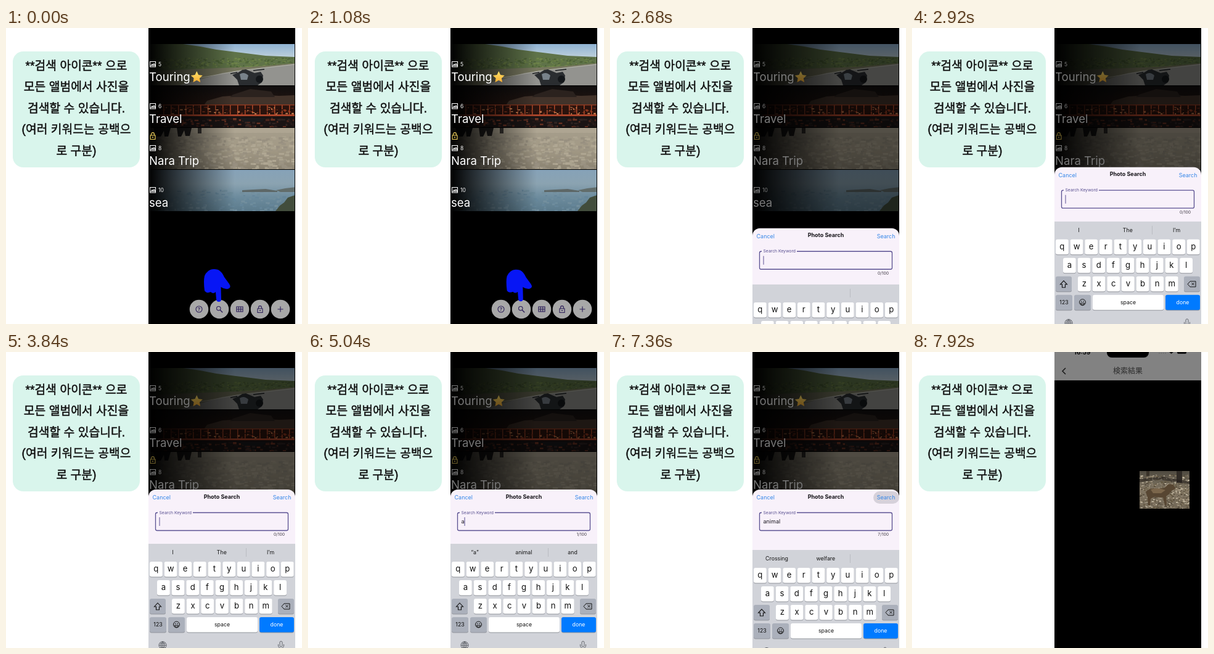
An HTML page with a canvas that plays this animation: 480x480 px, repeating every 8000 ms.

```html
<!DOCTYPE html>
<html lang="ko">
<head>
<meta charset="utf-8">
<title>Photo search guide</title>
<style>
html, body { margin: 0; height: 100%; overflow: hidden; background: #fff; }
canvas { display: block; width: 480px; height: 480px; }
</style>
</head>
<body>
<canvas id="stage" width="480" height="480"></canvas>
<script>
const LOOP = 8000, LEFT = 231, WIDTH = 238;
const KEYBOARD_HEIGHT = 186, SHEET_HEIGHT = 257;
const UI = 'Inter, "Noto Sans", sans-serif';
const KOREAN = '"Liberation Sans", "Noto Sans CJK KR", "Noto Sans CJK", sans-serif';
const JAPANESE = '"Noto Sans CJK JP", "Noto Sans CJK", sans-serif';
const PURPLE = '#594f91', INK = '#2b1d58';

const screen = document.getElementById('stage').getContext('2d');
let c = screen;

const clamp = x => Math.max(0, Math.min(1, x));
const progress = (t, start, length) => clamp((t - start) / length);
const easeOut = x => 1 - (1 - x) ** 3;
// Critically damped settling: 1 at the start, towards 0.
const settle = (t, start) => {
  const x = Math.max(0, t - start) * 0.0195;
  return (1 + x) * Math.exp(-x);
};
function random(seed) {
  return () => (seed = (seed * 16807) % 2147483647) / 2147483647;
}

function rect(x, y, w, h, fill) {
  c.fillStyle = fill;
  c.fillRect(x, y, w, h);
}
function round(x, y, w, h, r, fill) {
  c.beginPath();
  c.roundRect(x, y, w, h, r);
  c.fillStyle = fill;
  c.fill();
}
function disc(x, y, r, fill) {
  c.beginPath();
  c.arc(x, y, r, 0, Math.PI * 2);
  c.fillStyle = fill;
  c.fill();
}
function shape(d, fill) {
  c.fillStyle = fill;
  c.fill(new Path2D(d));
}
function line(d, color, width = 1) {
  c.strokeStyle = color;
  c.lineWidth = width;
  c.stroke(new Path2D(d));
}
function text(s, x, y, size, color, align = 'left', weight = 400, family = UI) {
  c.font = `${weight} ${size}px ${family}`;
  c.textAlign = align;
  c.fillStyle = color;
  c.fillText(s, x, y);
}
function vertical(y0, y1, ...colors) {
  const g = c.createLinearGradient(0, y0, 0, y1);
  colors.forEach((color, i) => g.addColorStop(i / (colors.length - 1), color));
  return g;
}
function at(x, y, draw) {
  c.save();
  c.translate(x, y);
  draw();
  c.restore();
}
function speckle(seed, count, w, y, h, colors, size) {
  const rnd = random(seed);
  for (let i = 0; i < count; i++) {
    rect(rnd() * w, y + rnd() * h, size * (0.5 + rnd()), size * (0.3 + rnd() * 0.4),
      colors[Math.floor(rnd() * colors.length)]);
  }
}

function roadPhoto() {
  rect(0, 0, WIDTH, 67, vertical(0, 24, '#8fb2d2', '#c3d3dc'));
  shape('M0 0H56L84 4 110 9 150 14 190 19 238 21V67H0Z', '#5f7349');
  speckle(11, 420, WIDTH, 22, 16, ['#72884a', '#4c6136', '#647a43'], 3);
  shape('M0 44L90 40 170 37 238 31V67H0Z', '#77775f');
  shape('M50 67L120 47 195 37 238 32V67Z', '#93938f');
  line('M72 57L148 43 238 33', '#b4b4a8', 1);
  shape('M136 50L146 46 152 42 158 41 165 44 172 47 182 45 186 51 184 62 177 67H147L144 58Z', '#2a2d30');
  shape('M148 49Q155 44 162 51L160 58H150Z', '#78828a');
  disc(180, 57, 6, '#14171a');
  line('M133 48L144 46M170 43L188 41', '#1d2022', 1.6);
}
function shrinePhoto() {
  rect(0, 0, WIDTH, 67, vertical(0, 67, '#110f0f', '#241510', '#0d0b0c'));
  shape('M95 24L120 17 165 14 212 16 238 15V31H90Z', '#42332a');
  shape('M137 14L165 5 199 9 205 18H132Z', '#2b221e');
  rect(20, 31, 218, 14, '#2b130d');
  for (let x = 24; x < WIDTH; x += 12) rect(x, 30, 1.5, 16, '#b04a2a');
  speckle(23, 110, WIDTH, 33, 12, ['#d98a56', '#6e2b1a', '#1c100d', '#94391f'], 3);
  rect(20, 30, 218, 1.5, '#8d3a22');
  rect(15, 46, 223, 3, '#a9442a');
  rect(0, 50, WIDTH, 17, '#1a1414');
  speckle(31, 120, WIDTH, 51, 15, ['#4a261d', '#6e3524', '#241817', '#2f2422'], 5);
  shape('M147 52H190L184 58H155Z', '#18191b');
}
function pavementPhoto() {
  rect(0, 0, WIDTH, 67, vertical(0, 67, '#a59d8b', '#a39a86', '#8b8372'));
  speckle(47, 500, WIDTH, 12, 54, ['#aaa28e', '#989080', '#b0a793', '#9c9483'], 6);
  rect(0, 0, WIDTH, 8, '#aea592');
  shape('M8 0H36L32 14H26L25 5 20 14H12Z', '#171719');
  shape('M46 0H70L67 13H60L58 4 53 14H48Z', '#22201f');
  rect(80, 0, 6, 9, '#3a3632');
}
function seaPhoto() {
  rect(0, 0, WIDTH, 67, vertical(0, 67, '#86a2b8', '#8ba3b1', '#6c8b9d', '#5c7b8c'));
  speckle(59, 160, WIDTH, 32, 34, ['#6f8d9d', '#66869a', '#738f9e'], 5);
  shape('M152 33L170 32 190 31 209 34V36H152Z', '#5d6767');
  shape('M207 33L222 30 238 28V36H214Z', '#626d6b');
  shape('M206 67L213 58 220 53 226 45 238 41V67Z', '#424d3c');
  speckle(67, 25, 24, 47, 20, ['#617048', '#313d29'], 3);
}

function starIcon(x, y, r) {
  c.beginPath();
  for (let i = 0; i < 10; i++) {
    const a = -Math.PI / 2 + i * Math.PI / 5, d = i % 2 ? r * 0.48 : r;
    c.lineTo(x + d * Math.cos(a), y + d * Math.sin(a));
  }
  c.closePath();
  c.fillStyle = vertical(y - r, y + r, '#ffe36b', '#f6a72c');
  c.fill();
}
function lockIcon(x, y, color) {
  line(`M${x - 4} ${y - 1}h8v6.5h-8zM${x - 2.4} ${y - 1}v-2a2.4 2.4 0 0 1 4.8 0v2`, color, 1.1);
  disc(x, y + 2.2, 1, color);
}
function albumRow(index, title, count, photo) {
  const y = 26 + index * 68;
  at(LEFT, y, () => {
    c.beginPath();
    c.rect(0, 0, WIDTH - 1, 67);
    c.clip();
    photo();
    const shade = c.createLinearGradient(0, 0, 140, 0);
    shade.addColorStop(0, '#000');
    shade.addColorStop(0.25, 'rgba(0,0,0,.74)');
    shade.addColorStop(1, 'rgba(0,0,0,0)');
    rect(0, 0, WIDTH, 67, shade);
  });
  line(`M233.5 ${y + 28.5}h9v8.5h-9zM235 ${y + 35}l2-2.5 1.5 1.5 1.5-2.2 2 3.2z`, '#fff', 1.1);
  text(count, 247, y + 36, 8.5, '#fff');
  text(title, 232, y + 60, 18.6, '#fff');
}
function toolButtons() {
  const y = 456;
  for (let i = 0; i < 5; i++) disc(313 + 33 * i, y, 15.3, '#a8a8a8');
  c.beginPath();
  c.arc(313, y, 5, 0, Math.PI * 2);
  c.strokeStyle = INK;
  c.lineWidth = 1.1;
  c.stroke();
  text('?', 313, y + 3, 8, INK, 'center', 600);
  c.beginPath();
  c.arc(344.8, y - 1.3, 3.2, 0, Math.PI * 2);
  c.stroke();
  line(`M347.2 ${y + 1.2}l4 4`, INK, 1.4);
  line(`M374 ${y - 4}h10v8h-10zM374 ${y}h10M377.4 ${y - 4}v8M380.7 ${y - 4}v8`, INK, 1.2);
  lockIcon(412, y, INK);
  line(`M440.5 ${y}h9M445 ${y - 4.5}v9`, INK, 1.1);
}
function drawGallery() {
  rect(LEFT, 0, WIDTH, 480, '#000');
  albumRow(0, 'Touring', '5', roadPhoto);
  albumRow(1, 'Travel', '6', shrinePhoto);
  albumRow(2, 'Nara Trip', '8', pavementPhoto);
  albumRow(3, 'sea', '10', seaPhoto);
  starIcon(309.3, 80, 10);
  lockIcon(238, 175, '#f3d35b');
  toolButtons();
}
function drawCaption() {
  rect(0, 0, 480, 480, '#fff');
  round(11, 38, 206, 188, 17, '#d9f5ec');
  c.strokeStyle = '#101010';
  c.lineWidth = 0.45;
  ['**검색 아이콘** 으로', '모든 앨범에서 사진을', '검색할 수 있습니다.', '(여러 키워드는 공백으', '로 구분)']
    .forEach((s, i) => {
      const y = 68 + i * 34.4;
      text(s, 114, y, 19.3, '#101010', 'center', 400, KOREAN);
      c.strokeText(s, 114, y);
    });
}
function drawHand(t) {
  const u = progress(t, 520, 960);
  const scale = 1 + 0.45 * Math.exp(-3.45 * u) * Math.sin(2 * Math.PI * u);
  at(342.5, 417.5, () => {
    c.scale(scale, scale);
    c.translate(-342.5, -417.5);
    shape('M328 394Q334 389 344 392Q350 395 354 404L362 415Q366 421 360 423Q354 424 348.5 420' +
      'L349 440Q349 444 345 444Q341.5 444 341 440L340 428Q336 432 332 428Q325 431 322 426' +
      'Q320 410 322 402Q324 397 328 394Z', '#0716f5');
  });
}

function key(label, x, y, w, fill = '#fff', size = 13, color = '#111') {
  round(x, y + 1, w, 24.5, 3, '#92959c');
  round(x, y, w, 24.5, 3, fill);
  if (label) text(label, x + w / 2, y + 12 + size * 0.34, size, color, 'center');
}
function drawKeyboard(offset, words) {
  at(0, offset, () => {
    const gray = '#abb0bb';
    rect(LEFT, 311, WIDTH, 210, '#d1d3d9');
    rect(389, 318, 1, 14, '#b9bbc1');
    words.forEach((word, i) => text(word, 270.5 + 79.3 * i, 328.3, 8.8, '#151515', 'center'));
    [['qwertyuiop', 233, 340], ['asdfghjkl', 245, 370], ['zxcvbnm', 269, 400]].forEach(([row, x, y]) =>
      [...row].forEach((letter, i) => key(letter, x + 23.65 * i, y, 20.8, '#fff', 13.2)));
    key('', 233, 400, 26, gray);
    line('M246 407l5.5 6h-3v5h-5v-5h-3z', '#111', 1.1);
    key('', 441, 400, 26, gray);
    line('M447 412.5l4-4.5h9v9h-9zM453.5 410.3l4 4M457.5 410.3l-4 4', '#111', 1);
    key('123', 233, 430, 27, gray, 8.8);
    key('', 263, 430, 27, gray);
    line('M271.5 442a5 5 0 1 0 10 0a5 5 0 1 0-10 0M273.5 443.2h6a3 3 0 0 1-6 0', '#111', 1);
    disc(274.8, 440.5, 0.8, '#111');
    disc(278.2, 440.5, 0.8, '#111');
    key('space', 293, 430, 115, '#fff', 8.8);
    key('done', 411, 430, 56, '#007aff', 8.8, '#fff');
    line('M248 475.5a6 6 0 1 0 12 0a6 6 0 1 0-12 0M248 475.5h12M254 469.5v12' +
      'M254 469.5q-6 6 0 12M254 469.5q6 6 0 12M249.5 472.3h9M249.5 478.7h9', '#575a60', 0.9);
    line('M444 471a2 2 0 0 1 4 0v5a2 2 0 0 1-4 0zM441.5 474v2a4.5 4.5 0 0 0 9 0v-2M446 480.5v3', '#575a60', 0.9);
  });
}
function drawSheet(offset, t, value) {
  at(0, offset, () => {
    round(LEFT, 223, WIDTH, 300, [12, 12, 0, 0], '#f8f1fa');
    if (t >= 7240) round(427, 226, 42, 20, 10, '#d6d1da');
    text('Cancel', 237.5, 239, 9, '#3487e8');
    text('Search', 462.5, 239, 9, '#3487e8', 'right');
    text('Photo Search', 350, 237.5, 9, '#161419', 'center', 650);
    c.beginPath();
    c.roundRect(242.5, 260.5, 215, 29, 2.5);
    c.strokeStyle = PURPLE;
    c.lineWidth = 1.3;
    c.stroke();
    rect(246, 259, 57, 3, '#f8f1fa');
    text('Search Keyword', 248.5, 262.7, 6.8, PURPLE);
    text(value, 248.5, 278.3, 9, '#1b1720');
    const caretOn = t < 7300 && (t + 320) % 1000 < 500;
    if (caretOn) rect(248.5 + c.measureText(value).width, 268, 1, 14, PURPLE);
    text(`${value.length}/100`, 452, 298.4, 6.8, '#48434d', 'right');
  });
}
function drawSearch(t) {
  const shown = progress(t, 2440, 250), leaving = progress(t, 7370, 270);
  rect(LEFT, 0, WIDTH, 480, `rgba(0,0,0,${0.54 * shown * (1 - leaving)})`);
  const closing = 1 - settle(t, 7342);
  const rise = KEYBOARD_HEIGHT * settle(t, 2605);
  const sheetOffset = 0.97 * rise + 92 * (1 - easeOut(progress(t, 2440, 200)))
    + SHEET_HEIGHT * easeOut(leaving);
  const value = t < 4600 ? '' : t < 5900 ? 'a' : 'animal ';
  const words = t < 2760 ? [] : !value ? ['I', 'The', 'I’m']
    : value === 'a' ? ['“a”', 'animal', 'and'] : ['Crossing', 'welfare'];
  drawSheet(sheetOffset, t, value);
  drawKeyboard(rise + KEYBOARD_HEIGHT * closing, words);
}

function animalPhoto() {
  c.beginPath();
  c.rect(0, 0, 81, 61);
  c.clip();
  rect(0, 0, 81, 61, vertical(0, 61, '#4f4a40', '#817663', '#716756'));
  speckle(83, 600, 81, 6, 55, ['#b6aa93', '#4a4032', '#958770', '#d0c6af', '#63573f'], 2.4);
  rect(60, 0, 9, 19, '#302b26');
  rect(11, 0, 5, 8, '#393229');
  shape('M0 13L35 9 81 17V21L32 14 0 18Z', 'rgba(35,30,26,.55)');
  shape('M10 34Q16 26 29 29L41 27 47 21 54 22 59 28 52 32 47 38 43 41 44 55H41L38 43 24 42' +
    ' 18 45 17 56H14L13 43Z', '#574632');
  shape('M18 30Q29 26 42 31L35 36 22 36Z', '#7b664b');
}
function drawResults() {
  rect(LEFT, 0, WIDTH, 480, '#000');
  rect(LEFT, 0, WIDTH, 46, '#828282');
  text('16:59', 276, 3.5, 10, '#050505', 'center', 700);
  round(316, -10, 68, 19, 8, '#000');
  for (let i = 0; i < 4; i++) disc(401 + 3.3 * i, 2, 0.8, '#636363');
  shape('M416 -1h9l-4.5 4z', '#111');
  round(430, -5, 15, 8, 2, '#111');
  line('M249 26l-5 5 5 5', '#171717', 1.5);
  text('検索結果', 350, 35, 12, '#2b2b2b', 'center', 400, JAPANESE);
  at(369, 193, animalPhoto);
}

function layer(draw) {
  const canvas = document.createElement('canvas');
  canvas.width = canvas.height = 480;
  c = canvas.getContext('2d');
  draw();
  c = screen;
  return canvas;
}
const home = layer(() => { drawCaption(); drawGallery(); });
const results = layer(drawResults);

function render(t) {
  c.drawImage(home, 0, 0);
  c.save();
  c.beginPath();
  c.rect(LEFT, 0, WIDTH, 480);
  c.clip();
  if (t < 1480) drawHand(t);
  if (t >= 2440) drawSearch(t);
  c.globalAlpha = progress(t, 7400, 300);
  if (c.globalAlpha) c.drawImage(results, 0, 0);
  c.restore();
}
const start = performance.now();
function frame() {
  render((performance.now() - start) % LOOP);
  requestAnimationFrame(frame);
}
frame();
</script>
</body>
</html>
```
